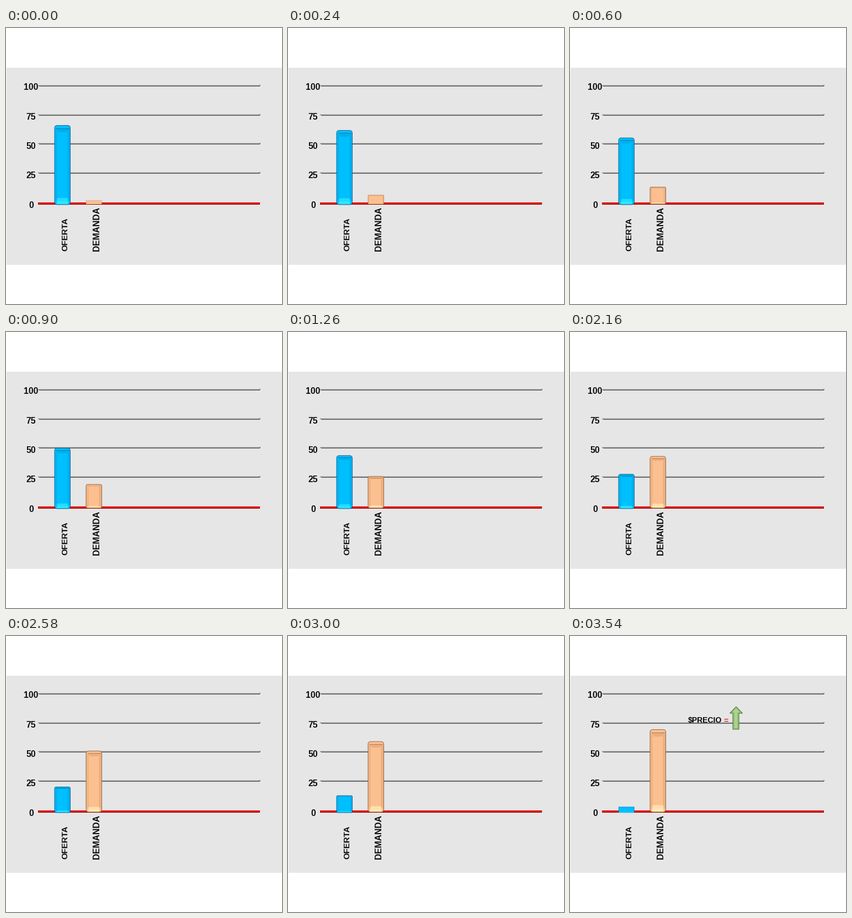
A matplotlib script for the animation above (4800 ms loop, 500 by 500 pixels).

```python
import matplotlib.pyplot as plt
from matplotlib.animation import FuncAnimation
from matplotlib.patches import FancyBboxPatch, Polygon, Rectangle

SIZE, DPI = 500, 100
PX = 72 / DPI  # points per pixel
STEP_MS, FRAMES, LAST_STEP = 60, 80, 59

fig = plt.figure(figsize=(SIZE / DPI, SIZE / DPI), dpi=DPI, facecolor="white")
ax = fig.add_axes([0, 0, 1, 1])
ax.set(xlim=(0, SIZE), ylim=(SIZE, 0))
ax.axis("off")


def box(x0, y0, x1, y1, color, z=1):
    ax.add_patch(Rectangle((x0, y0), x1 - x0, y1 - y0, fc=color, lw=0, zorder=z))


def shape(points, color, alpha=1.0, z=5, edge="none", lw=0):
    return ax.add_patch(Polygon(points, closed=True, fc=color, alpha=alpha,
                                ec=edge, lw=lw * PX, zorder=z))


def label(x, y, text, size, color="#0a0a0a", **kwargs):
    return ax.text(x, y, text, fontsize=size * PX, color=color,
                   family="Liberation Sans", weight="bold", zorder=8, **kwargs)


class BevelBar:
    """Glossy bar whose bevel stretches with its height."""

    def __init__(self, x0, x1, bottom, top_from, top_to, fill, glow, dark):
        self.x0, self.x1, self.bottom = x0, x1, bottom
        self.top_from, self.top_to = top_from, top_to
        self.body = ax.add_patch(FancyBboxPatch(
            (x0, top_from), x1 - x0, bottom - top_from, fc=fill, ec=dark,
            lw=PX, boxstyle="round,pad=0,rounding_size=1", zorder=4))
        blank = [(x0, bottom)] * 4
        self.left = shape(blank, dark, 0.1)
        self.right = shape(blank, dark, 0.14)
        self.shade = shape(blank, dark, 0.15)
        self.foot = shape(blank, glow, 0.6)
        self.foot_core = shape(blank, glow, 0.6)
        self.rim, = ax.plot([], [], color=dark, lw=PX, alpha=0.5, zorder=6)

    def update(self, progress):
        top = self.top_from + (self.top_to - self.top_from) * progress
        height = self.bottom - top
        x0, x1, bottom = self.x0, self.x1, self.bottom
        radius = max(0.3, min(5, height * 0.065))
        self.body.set_bounds(x0, top, x1 - x0, height)
        self.body.set_boxstyle("round", pad=0, rounding_size=radius)
        self.body.set_edgecolor((*self.body.get_edgecolor()[:3],
                                 min(0.8, height / 35)))

        inset = min(5, height * 0.12)
        upper, lower = top + height * 0.035, bottom - height * 0.085
        xl, xr = x0 + inset, x1 - inset
        corner = radius * 0.6
        self.left.set_xy([(x0 + 0.5, top + radius), (xl, upper),
                          (xl, lower), (x0 + 0.5, bottom - radius)])
        self.right.set_xy([(x1 - 0.5, top + radius), (xr, upper),
                           (xr, lower), (x1 - 0.5, bottom - radius)])
        shade_end = upper + height * 0.05
        self.shade.set_xy([(x0 + corner, upper), (x1 - corner, upper),
                           (xr - 2, shade_end), (xl + 2, shade_end)])
        foot_base = [(x1 - corner - 0.5, bottom - 1), (x0 + corner + 0.5, bottom - 1)]
        core = (lower + bottom) / 2
        self.foot.set_xy([(xl, lower), (xr, lower), *foot_base])
        self.foot_core.set_xy([(xl, core), (xr, core), *foot_base])
        self.rim.set_data([x0 + corner, x1 - corner], [upper, upper])
        self.rim.set_visible(height > 45)


box(1, 72, 500, 429, "#e6e6e6", 0)

for i, value in enumerate((100, 75, 50, 25, 0)):
    label(45.4, 106 + 53.5 * i, str(value), 15.8, ha="center", va="center_baseline")
    if value:
        y = round(103.9 + 52.7 * i)
        box(58, y - 1, 461, y, "#c6c6c6")
        box(58, y, 461, y + 1, "#858585")
        box(60, y + 1, 460, y + 2, "#5c5c5c")
        box(459, y - 1, 461, y + 1, "#808080")
box(58, 316, 460, 319, "#e00000", 2)
box(58, 319, 460, 320, "#980000", 2)

for x, text, size in ((114.5, "OFERTA", 15), (171.5, "DEMANDA", 15.8)):
    label(x, 404.5, text, size, rotation=90, ha="right", va="bottom")

supply = BevelBar(88, 116.5, 320, 176.5, 309.5, "#00bfff", "#38f0ff", "#075080")
demand = BevelBar(145, 173.5, 319, 312.5, 169.5, "#fcbf8f", "#fff3c0", "#80502c")

arrow = [(301, 128), (312.5, 140), (306, 140), (306, 169),
         (295, 169), (295, 140), (289.5, 140)]
price = [
    label(275, 157.5, "$PRECIO", 14, ha="right", va="baseline"),
    label(282.8, 157.5, "=", 14, "#e81c24", ha="center", va="baseline"),
    shape(arrow, "#94bf78", edge="#4d7338", lw=1),
    shape([(301, 131), (307.5, 138), (294.5, 138)], "#b4d99b", 0.8, 6),
    shape([(298, 138), (303, 138), (303, 167), (298, 167)], "#b4d99b", 0.8, 6),
]


def draw(frame):
    step = min(frame, LAST_STEP)
    for bar in (supply, demand):
        bar.update(step / LAST_STEP)
    for part in price:
        part.set_visible(step == LAST_STEP)
    return []


anim = FuncAnimation(fig, draw, frames=FRAMES, interval=STEP_MS,
                     repeat=True, repeat_delay=0, blit=False)
plt.show()
```
